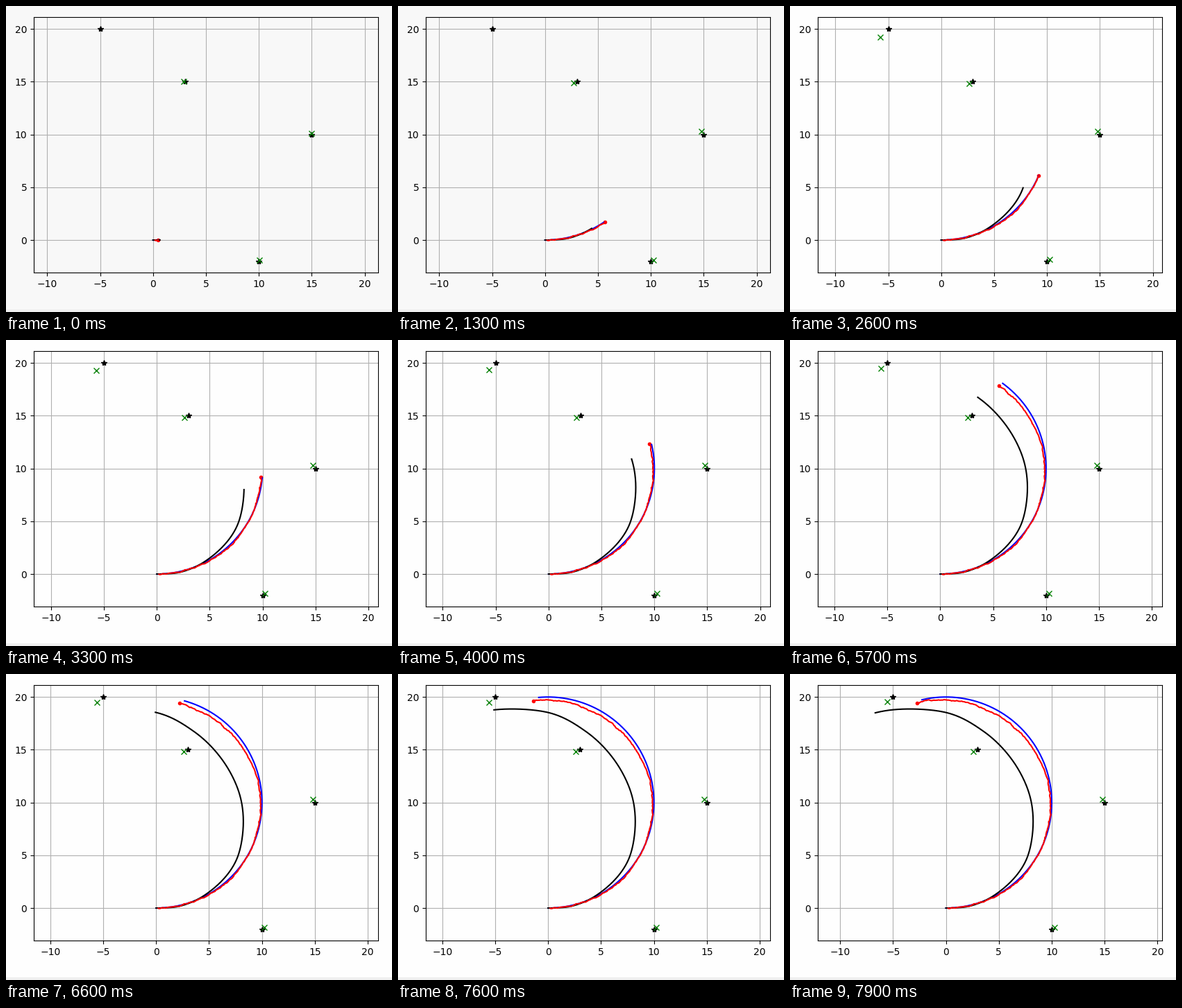
Recreate the animation shown at these times as a matplotlib script. Size 556x442 px, loop 8 s.

```python
import numpy as np
import matplotlib.pyplot as plt
from matplotlib.animation import FuncAnimation
from matplotlib.patches import Rectangle

W, H, DPI = 556, 442, 100
FRAMES, INTERVAL = 80, 100
STRIP = 4                                 # grey window edge below the canvas
CANVAS_W, CANVAS_H, CROP_X = 640, 479, 40
PAUSES = np.array([10, 45, 60, 67, 75])   # frames that repeat the previous picture
STEP = 0.01                               # turn angle of one simulation step
RADIUS = 10.0
RANGE = 20.0                              # sensor range
Y_MIN, Y_MAX = -3.1, 21.1

LANDMARKS = np.array([(10, -2), (15, 10), (3, 15), (-5, 20)], float)

# landmark estimates settle from a first guess: start, end, settling time
ESTIMATES = np.array([
    (10.05, -1.92, 10.25, -1.86, 6),
    (14.95, 10.10, 14.78, 10.30, 5),
    (2.90, 15.00, 2.61, 14.81, 10),
    (-5.78, 19.20, -5.55, 19.56, 20)])

# dead reckoning drifts off the true circle: update number, x, y
DRIFT = np.array([
    (-2, 0, 0), (0, .65, .01), (6, 2.5, .25), (12, 4.4, 1.1),
    (25, 7.74, 4.95), (32, 8.24, 8), (39, 7.85, 10.9), (47, 6.2, 14.12),
    (55, 3.55, 16.75), (63, -.07, 18.55), (70, -4.55, 18.83),
    (74, -6.68, 18.5)])


def smooth(knots, u):
    """Cubic curve through (u, x, y) knots, evaluated at u."""
    t, p = knots[:, 0], knots[:, 1:]
    slope = np.gradient(p, t, axis=0, edge_order=2)
    i = np.clip(np.searchsorted(t, u, side="right") - 1, 0, len(t) - 2)
    h = (t[i + 1] - t[i])[:, None]
    w = (u - t[i])[:, None] / h
    ease = w * w * (3 - 2 * w)
    return (p[i] * (1 - ease) + p[i + 1] * ease
            + h * w * (1 - w) * ((1 - w) * slope[i] - w * slope[i + 1]))


def circle(angle, radius=RADIUS):
    return np.column_stack([radius * np.sin(angle),
                            RADIUS - radius * np.cos(angle)])


def jitter(rng, n, size, keep=0.75):
    noise = np.zeros(n)
    for i in range(1, n):
        noise[i] = keep * noise[i - 1] + rng.normal(0, size)
    return noise


def bump(x, center, width):
    return np.exp(-((x - center) / width) ** 2)


def turned(k):
    return 0.05 + 0.0448 * k


def estimated_path(angle):
    rng = np.random.default_rng(7)
    offset = 0.1 * bump(angle, .75, .4) - 0.4 * bump(angle, 2.6, .85)
    lead = 0.025 * np.maximum(0, angle - 1.2)
    n = len(angle)
    return circle(angle + lead + jitter(rng, n, .0025),
                  RADIUS + offset + jitter(rng, n, .023))


updates = np.arange(FRAMES)
angles = np.arange(341) * STEP
true_path = circle(angles)
est_path = estimated_path(angles)

# the far landmark is found once the robot is close enough
gap = np.hypot(*(circle(turned(updates)) - LANDMARKS[3]).T)
FOUND_AT = int(np.argmax(gap <= RANGE))
first_seen = np.array([0, 0, 0, FOUND_AT])

fig = plt.figure(figsize=(W / DPI, H / DPI), dpi=DPI)
ax_w, ax_h = 0.775 * CANVAS_W, 0.77 * CANVAS_H
half_w = ax_w / ax_h * (Y_MAX - Y_MIN) / 2
ax = fig.add_axes([(0.125 * CANVAS_W - CROP_X) / W,
                   (0.11 * CANVAS_H + STRIP) / H, ax_w / W, ax_h / H])
ax.set_ylim(Y_MIN, Y_MAX)
ax.set_xticks(range(-10, 21, 5))
ax.set_yticks(range(0, 21, 5))
ax.grid(True)
fig.add_artist(Rectangle((0, 0), 1, STRIP / H, color="#f0f0f0", lw=0,
                         transform=fig.transFigure))

ax.plot(*LANDMARKS.T, "*k")
particles, = ax.plot([], [], ".r")
found, = ax.plot([], [], "xg")
true_line, = ax.plot([], [], "-b")
drift_line, = ax.plot([], [], "-k")
est_line, = ax.plot([], [], "-r")


def draw(frame):
    k = frame - np.count_nonzero(PAUSES <= frame)

    n = int(round(turned(k) / STEP)) + 1
    true_line.set_data(*true_path[:n].T)
    est_line.set_data(*est_path[2:n].T)
    particles.set_data(*est_path[n - 1:n].T)

    drift = smooth(DRIFT, np.linspace(-2, k, 4 * (k + 2) + 1))
    drift_line.set_data(*drift.T)

    seen = first_seen <= k
    est = ESTIMATES[seen]
    left = np.exp(-(k - first_seen[seen]) / est[:, 4])[:, None]
    marks = est[:, 2:4] + (est[:, :2] - est[:, 2:4]) * left
    found.set_data(*marks.T)

    # the view stays centred on everything drawn
    low = min(LANDMARKS[:, 0].min(), marks[:, 0].min(), drift[:, 0].min())
    mid = (low + LANDMARKS[:, 0].max()) / 2
    ax.set_xlim(mid - half_w, mid + half_w)

    shade = "#fefefe" if k >= FOUND_AT else "#f8f8f8"
    fig.set_facecolor(shade)
    ax.set_facecolor(shade)
    return []


anim = FuncAnimation(fig, draw, frames=FRAMES, interval=INTERVAL,
                     init_func=lambda: draw(0), repeat=True, repeat_delay=0)
plt.show()
```
